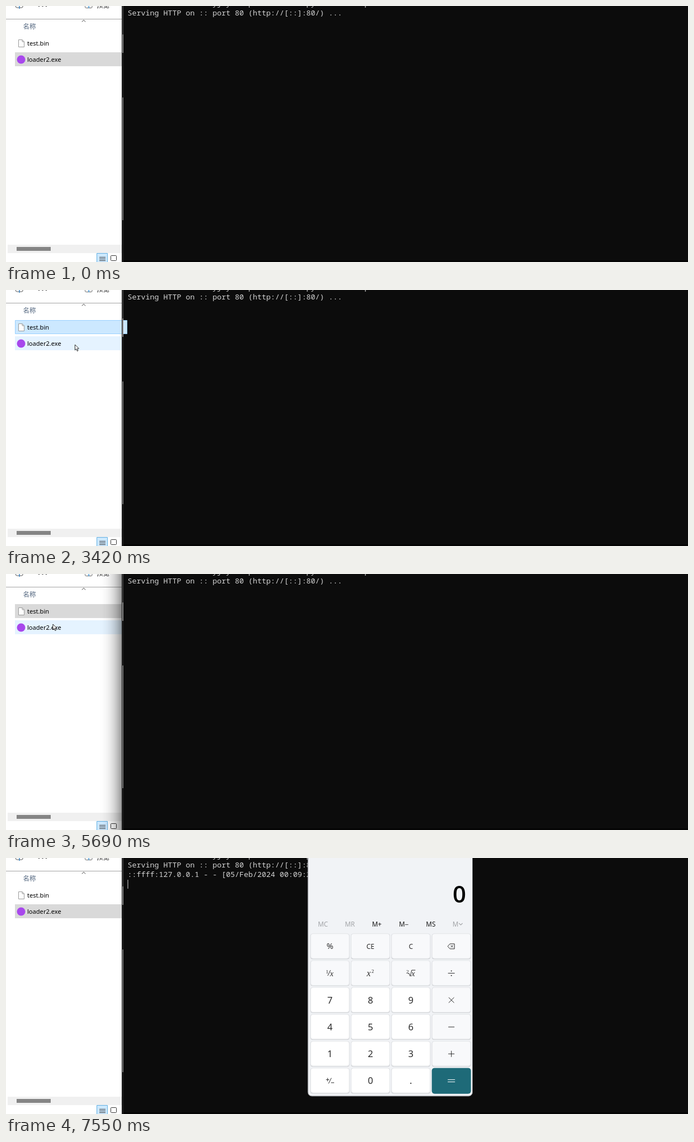
An HTML page with a canvas that plays this animation: 1220 by 459 pixels, repeating every 8 s.

```html
<!DOCTYPE html>
<html lang="zh">
<head>
<meta charset="utf-8">
<title>Loader demo</title>
<style>
html, body { margin: 0; width: 100%; height: 100%; overflow: hidden; background: #0c0c0c; }
canvas { display: block; width: 1220px; height: 459px; }
</style>
</head>
<body>
<canvas id="stage" width="1220" height="459"></canvas>
<script>
const ctx = document.getElementById('stage').getContext('2d');
const LOOP = 8000;
const UI = '"Noto Sans", sans-serif';
const CJK = '"Noto Sans CJK SC", "Noto Sans CJK", sans-serif';
const MONO = '13.333px "Noto Sans Mono", monospace';
const SERIF = '"Liberation Serif", serif';
const INK = '#2a2a2a';

// Story beats in ms.
const SELECT = 1750, AGAIN = 2600, DRAG = 4280, DROP = 4990, CLEAR = 5060;
const RUN = 5840, RERUN = 6320, SERVED = 6440, OPEN = 6930, BLUR = 7120;

const COL0 = 217.5, CELL = 8, ROW0 = 4, ROW_H = 17;

const clamp = u => Math.max(0, Math.min(1, u));
const ease = u => u * u * (3 - 2 * u);

// The pointer rests between moves.
const START = { x: 1251, y: 493 };
const moves = [
  { at: 380, ms: 200, x: 426, y: 216 },
  { at: 790, ms: 770, x: 56, y: 67 },
  { at: 3160, ms: 260, x: 123, y: 98 },
  { at: 3420, ms: 490, x: 364, y: 26 },
  { at: 4030, ms: 220, x: 220, y: 16 },
  { at: DRAG, ms: 510, x: 597, y: 22 },
  { at: DROP, ms: 700, x: 83.5, y: 90 },
  { at: 7200, ms: 330, x: 230, y: -20 }
];

function pointer(t) {
  return moves.reduce((p, m) => {
    const u = ease(clamp((t - m.at) / m.ms));
    return { x: p.x + (m.x - p.x) * u, y: p.y + (m.y - p.y) * u };
  }, START);
}

function rect(x, y, w, h, color) {
  ctx.fillStyle = color;
  ctx.fillRect(x, y, w, h);
}

function text(s, x, y, font, color, align = 'left') {
  ctx.font = font;
  ctx.fillStyle = color;
  ctx.textAlign = align;
  ctx.fillText(s, x, y);
}

function line(points, color, width = 1, fill) {
  ctx.beginPath();
  points.forEach(([x, y]) => ctx.lineTo(x, y));
  if (fill) {
    ctx.closePath();
    ctx.fillStyle = fill;
    ctx.fill();
  }
  ctx.strokeStyle = color;
  ctx.lineWidth = width;
  ctx.stroke();
}

function box(x, y, w, h, r, fill, stroke) {
  ctx.beginPath();
  ctx.roundRect(x, y, w, h, r);
  if (fill) { ctx.fillStyle = fill; ctx.fill(); }
  if (stroke) { ctx.strokeStyle = stroke; ctx.lineWidth = 1; ctx.stroke(); }
}

function dot(x, y, r, color) {
  ctx.beginPath();
  ctx.arc(x, y, r, 0, 7);
  ctx.fillStyle = color;
  ctx.fill();
}

// Positive h points down.
const chevron = (x, y, h, color) => line([[x - 3.2, y - h], [x, y], [x + 3.2, y - h]], color, 1.1);

function terminal(t) {
  rect(210, 0, 1010, 459, '#0c0c0c');
  rect(210, 456, 1010, 3, '#050505');
  const print = (s, row, color) => text(s, COL0, row * ROW_H, MONO, color);
  const selecting = t >= DRAG && t < CLEAR;
  if (selecting) {
    const p = pointer(Math.min(t, DROP));
    const width = Math.ceil((p.x - COL0) / CELL) * CELL;
    const below = p.y > ROW0 + ROW_H;
    rect(COL0, ROW0, below ? 998.5 : width, ROW_H, '#868686');
    if (below) rect(COL0, ROW0 + ROW_H, width, ROW_H, '#868686');
  }
  print('C:\\wo\\local-work-ofyjuy\\outputdir\\loads>python -m http.server 80', 0, '#ccc');
  print('Serving HTTP on :: port 80 (http://[::]:80/) ...', 1, selecting ? '#fff' : '#d4d4d4');
  if (t >= SERVED) {
    print('::ffff:127.0.0.1 - - [05/Feb/2024 00:09:26] "GET /test.bin HTTP/1.1" 200 -', 2, '#d4d4d4');
    rect(COL0, 39, 1, 16, '#d8d8d8');
  }
}

function fileRow(y, name, selected, active, p) {
  const hover = p.x >= 16 && p.x < 207 && p.y >= y && p.y < y + 25;
  if (selected && active) box(16.5, y + .5, 200, 24, 0, '#cce8ff', '#99d1ff');
  else if (selected) rect(16, y, 191, 25, '#d9d9d9');
  else if (hover) rect(16, y, 191, 25, '#e5f3ff');
  text(name, 38, y + 17, '11.1px ' + UI, '#000');
}

function toolbar() {
  box(17.5, -6, 12.5, 9, 2, null, '#555');
  rect(23.3, -1, 1.4, 6, '#2f7fc4');
  for (let i = 0; i < 3; i++) dot(59 + i * 6.5, -.5, 1.5, '#333');
  box(141.5, -8, 12.5, 11.5, 2, null, '#666');
  rect(147.5, -2, 1.4, 6, '#2f8fd8');
  text('预览', 162, 3, '11.5px ' + CJK, '#1a1a1a');
  rect(0, 23, 207, 1, '#a3a3a3');
  chevron(139, 25.2, -3.2, '#777');
  text('名称', 30.5, 41, '11.5px ' + CJK, '#4c607a');
}

function footer() {
  rect(3, 428, 204, 15, '#f0f0f0');
  rect(19, 432, 61, 7, '#858585');
  box(162.5, 443.5, 19, 20, 0, '#cce8ff', '#62b0e2');
  for (let i = 0; i < 3; i++) rect(167, 450 + i * 3, 11, 1, '#333');
  box(187.5, 447.5, 10, 9, 1, null, '#333');
}

function explorer(t, p) {
  rect(0, 0, 207, 459, '#fff');
  toolbar();
  const active = (t > SELECT + 60 && t < DRAG) || (t >= RUN && t < BLUR);
  const onTest = t > SELECT + 60 && t < RUN;
  fileRow(54, 'test.bin', onTest, active, p);
  fileRow(83, 'loader2.exe', !onTest, active, p);
  line([[22.5, 60.5], [29, 60.5], [32.5, 64], [32.5, 73.5], [22.5, 73.5], [22.5, 60.5]], '#9a9a9a', 1, '#fdfdfd');
  line([[29, 60.5], [29, 64], [32.5, 64]], '#9a9a9a');
  dot(27, 96, 7.5, '#a848ec');
  footer();

  // Shadow of the focused terminal.
  if (t >= DRAG && t < RUN) {
    for (let i = 0; i < 45; i++) rect(162 + i, 0, 1, 459, `rgba(0,0,0,${.42 * (i / 45) ** 2.5})`);
  }
  rect(207, 0, 3, 459, '#1c1c1c');
  rect(208, 0, 2, 51, '#3c3c3c');
  rect(208, 51, 2, 33, '#8a8a8a');
  rect(208, 164, 2, 220, '#777');
}

function glyph(name, x, y) {
  const label = (s, dx, dy, font) => text(s, x + dx, y + dy, font, INK, 'center');
  const serif = (s, dx, dy, size) => label(s, dx, dy, `italic ${size}px ${SERIF}`);
  const small = (s, dx, dy) => label(s, dx, dy, `9px ${SERIF}`);
  const stroke = (...points) => line(points.map(([a, b]) => [x + a, y + b]), INK);
  const cross = (dx, r) => {
    stroke([dx - r, -r], [dx + r, r]);
    stroke([dx + r, -r], [dx - r, r]);
  };
  const bar = (dx, dy, r) => rect(x + dx - r, y + dy - .5, 2 * r, 1, name === '=' ? '#fff' : INK);
  const draw = {
    back() {
      stroke([-6.5, 0], [-2.5, -4.5], [5.5, -4.5], [5.5, 4.5], [-2.5, 4.5], [-6.5, 0]);
      cross(1, 2);
    },
    inverse() {
      small('1', -5, 0);
      stroke([-4, 4.5], [1, -5.5]);
      serif('x', 3, 5, 14);
    },
    square() {
      serif('x', -3, 5, 16);
      small('2', 4, -1);
    },
    root() {
      small('2', -6, 0);
      stroke([-5, 1], [-3.5, 0], [-1, 5.5], [1.5, -5.5], [8, -5.5]);
      serif('x', 4, 5, 14);
    },
    sign() {
      bar(-4.2, -2, 2.8);
      stroke([-4.2, -5], [-4.2, 1]);
      stroke([-2.5, 5], [2.5, -5]);
      bar(4.7, 3.5, 2.8);
    },
    '÷'() {
      bar(0, 0, 6);
      dot(x, y - 4.2, 1, INK);
      dot(x, y + 4.2, 1, INK);
    },
    '×'() { cross(0, 4.8); },
    '−'() { bar(0, 0, 5.5); },
    '+'() {
      bar(0, 0, 5.5);
      stroke([0, -5.5], [0, 5.5]);
    },
    '='() {
      bar(0, -2, 6.5);
      bar(0, 2, 6.5);
    },
    '%'() { label(name, 0, 5, '14.5px ' + UI); }
  }[name];
  if (draw) draw();
  else if (name[0] === 'C') label(name, 0, 4.8, '12px ' + UI);
  else label(name, 0, 6, '16.5px ' + UI);
}

function calculator(t) {
  if (t <= OPEN) return;
  const zoom = 1 - .048 * (1 - clamp((t - OPEN) / 450)) ** 3;
  ctx.save();
  ctx.globalAlpha = clamp((t - OPEN) / 70);
  ctx.translate(637, 185);
  ctx.scale(zoom, zoom);
  ctx.translate(-637, -185);
  box(540, -50, 294.5, 477, 7, '#f1f3f6', '#77797c');

  text('标准', 584, -4, `bold 17px ${CJK}`, '#1a1a1a');
  rect(642, -5, 6, 1.5, '#333');
  ctx.beginPath();
  ctx.arc(813, -11, 7, 0, Math.PI);
  ctx.stroke();
  text('0', 823, 80, '600 42px "Open Sans", "Noto Sans", sans-serif', '#000', 'right');

  ['MC', 'MR', 'M+', 'M−', 'MS', 'M'].forEach((label, i) => {
    const off = i < 2 || i > 4;
    text(label, 567 + i * 48.2 - (i === 5 ? 4 : 0), 122.5, '11.7px ' + UI, off ? '#a3a5a8' : '#1a1a1a', 'center');
  });
  chevron(813.5, 120, 3, '#a3a5a8');

  const keys = '% CE C back inverse square root ÷ 7 8 9 × 4 5 6 − 1 2 3 + sign 0 . ='.split(' ');
  keys.forEach((key, i) => {
    const col = i % 4, row = Math.floor(i / 4);
    const x = 545 + col * 72.4, y = 135.7 + row * 48.2;
    const plain = row > 1 && col < 3;
    if (key === '=') box(x - .5, y - .3, 70, 46.3, 5, '#1e6a78');
    else {
      box(x - .5, y, 70, 45.7, 4, '#cfd1d4');
      box(x, y, 69, 44.5, 4, plain ? '#fff' : '#f8f9fb', '#e4e6e9');
    }
    glyph(key, x + 34.5, y + 22.7);
  });
  ctx.restore();
}

function cursor(t, p) {
  for (const down of [SELECT, AGAIN, DRAG, RUN, RERUN]) {
    const up = down === DRAG ? DROP : down + 70;
    if (t < down || t > up + 130) continue;
    ctx.globalAlpha = .82 * (1 - clamp((t - up) / 130));
    dot(p.x, p.y + .5, 7.3, '#ded428');
    ctx.globalAlpha = 1;
  }
  const arrow = [[0, 0], [0, 9.8], [2.3, 7.8], [4, 11.6], [5.6, 10.8], [4, 7.2], [7, 7], [0, 0]];
  line(arrow.map(([x, y]) => [p.x + x + .4, p.y + y]), '#111', .9, '#fff');
}

function draw() {
  const t = performance.now() % LOOP;
  const p = pointer(t);
  terminal(t);
  explorer(t, p);
  calculator(t);
  cursor(t, p);
  requestAnimationFrame(draw);
}
draw();
</script>
</body>
</html>
```
